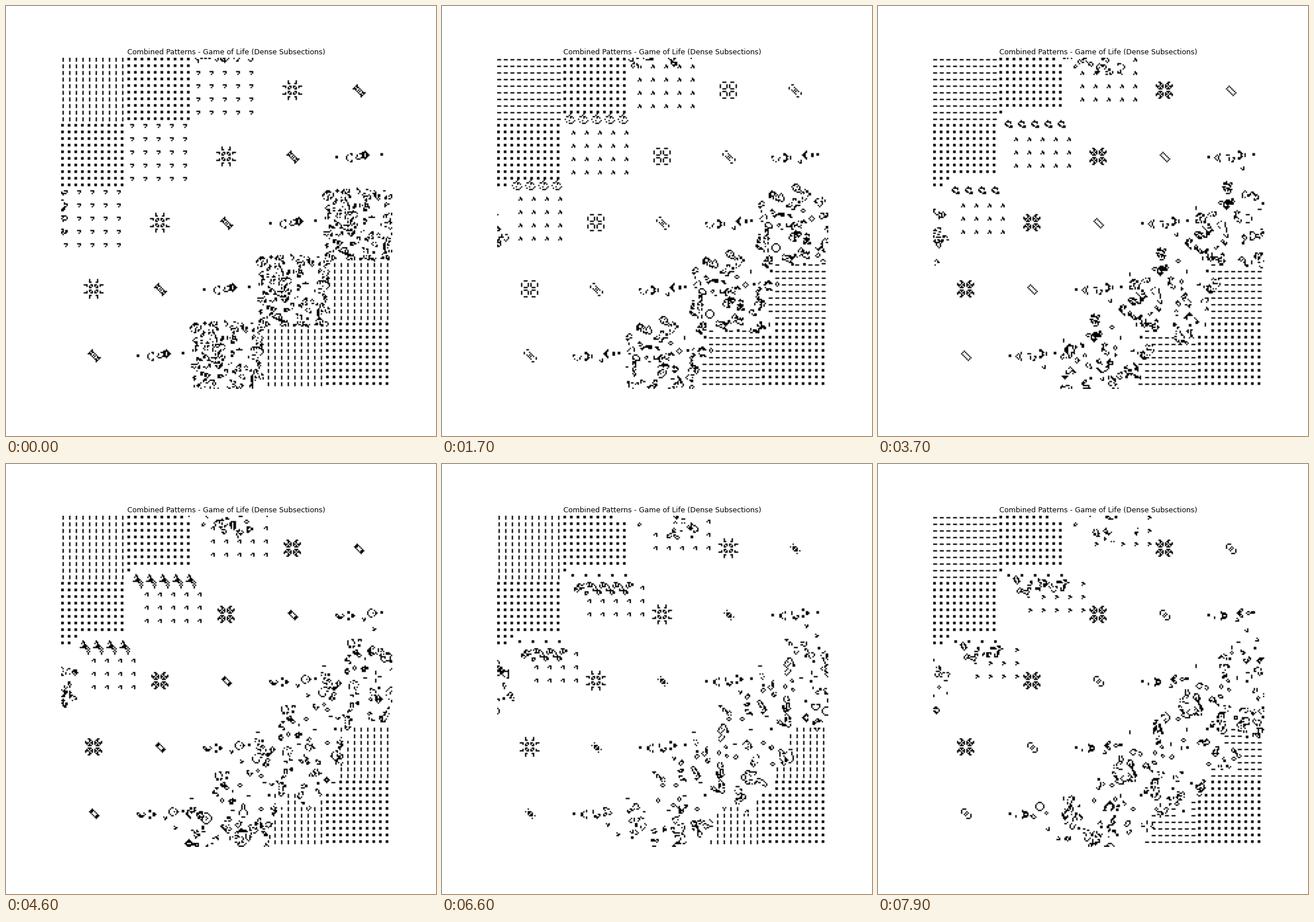
Recreate the animation shown at these times as a matplotlib script. Size 748 px wide and 748 px high, loop 8000 ms.

```python
import numpy as np
import matplotlib.pyplot as plt
from matplotlib.animation import FuncAnimation

SIZE, DPI = 748, 72
SIDE, TILES = 50, 5
FRAMES, INTERVAL, WARMUP = 80, 100, 4

GUN = """
........................#...........
......................#.#...........
............##......##............##
...........#...#....##............##
##........#.....#...##..............
##........#...#.##....#.#...........
..........#.....#.......#...........
...........#...#....................
............##......................
"""


def parse(text):
    return np.array([[c == "#" for c in row] for row in text.split()], int)


def tiled(shape, gap, start=0):
    tile = np.zeros((SIDE, SIDE), int)
    h, w = shape.shape
    for r in range(start, SIDE, gap):
        for c in range(start, SIDE, gap):
            tile[r:r + h, c:c + w] = shape
    return tile


def centred(shape):
    tile = np.zeros((SIDE, SIDE), int)
    h, w = shape.shape
    r, c = (SIDE - h) // 2, (SIDE - w) // 2
    tile[r:r + h, c:c + w] = shape
    return tile


def pulsar():
    p = np.zeros((13, 13), int)
    p[np.ix_([0, 5, 7, 12], [2, 3, 4, 8, 9, 10])] = 1
    return p | p.T


def soup():
    rng = np.random.RandomState(7)
    tile = (rng.rand(SIDE, SIDE) < 0.5).astype(int)
    tile[6:20, 31:44] = 0
    return tile


def step(grid):
    near = sum(np.roll(grid, (dr, dc), (0, 1))
               for dr in (-1, 0, 1) for dc in (-1, 0, 1) if dr or dc)
    return ((near == 3) | ((near == 2) & (grid == 1))).astype(int)


blinker = np.array([[0, 1, 0]] * 3)
glider = parse("### ..# .#.")
eight = np.kron(np.eye(2, dtype=int), np.ones((3, 3), int))
kinds = [
    tiled(blinker, 5),
    tiled(np.ones((2, 2), int), 5),
    tiled(glider, 10, 1),
    centred(pulsar()),
    centred(eight),
    centred(parse(GUN)),
    soup(),
]

grid = np.block([[kinds[(i + j) % len(kinds)] for j in range(TILES)]
                 for i in range(TILES)])
for _ in range(WARMUP):
    grid = step(grid)
history = [grid]
while len(history) < FRAMES:
    history.append(step(history[-1]))

fig = plt.figure(figsize=(SIZE / DPI, SIZE / DPI), dpi=DPI, facecolor="white")
ax = fig.add_axes([96 / SIZE, 82 / SIZE, 576 / SIZE, 576 / SIZE])
ax.axis("off")
# soft cell edges
image = ax.imshow(history[0], cmap="binary", vmin=0, vmax=1,
                  interpolation="hanning")
ax.set_title("Combined Patterns - Game of Life (Dense Subsections)",
             x=(383.4 - 96) / 576, fontsize=12.47, pad=6.25,
             fontfamily="DejaVu Sans")


def update(n):
    image.set_data(history[n])
    return [image]


anim = FuncAnimation(fig, update, frames=FRAMES, interval=INTERVAL,
                     repeat=True, repeat_delay=0, blit=False)
plt.show()
```
